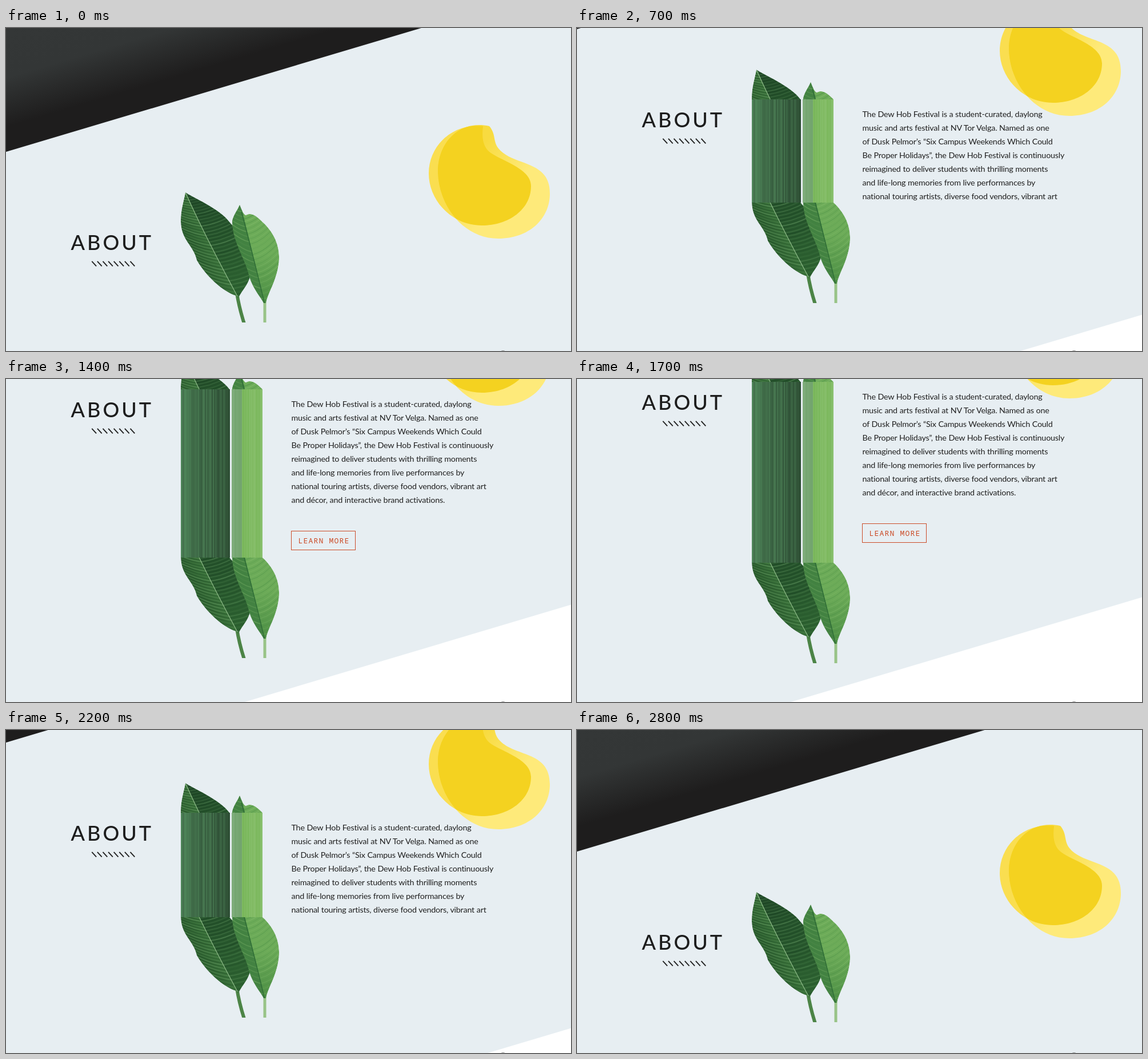
Write an HTML page that moves like this. It is 989 px wide and 566 px high and loops after 2.95 s.

```html
<!DOCTYPE html>
<html lang="en">
<head>
<meta charset="utf-8">
<title>About</title>
<style>
  html, body { margin: 0; width: 100%; height: 100%; overflow: hidden; background: #e7eef2; }
  svg { display: block; width: 989px; height: 566px; }
  .title { font: 500 36px Lato, sans-serif; letter-spacing: 4px; fill: #1d1d1d; }
  .copy { font: 14.3px Lato, sans-serif; letter-spacing: -.2px; word-spacing: .3px; fill: #1f1f1f; }
  .btn { font: 13px "Noto Sans Mono", monospace; letter-spacing: 1.2px; fill: #cb4c28; }
</style>
</head>
<body>
<svg viewBox="0 0 989 566">
  <defs>
    <linearGradient id="night" gradientUnits="userSpaceOnUse" x1="0" y1="217" x2="-59" y2="18">
      <stop offset=".2" stop-color="#1e1d1d"/>
      <stop offset=".6" stop-color="#333636"/>
      <stop offset="1" stop-color="#343737"/>
    </linearGradient>
    <linearGradient id="glow" gradientUnits="userSpaceOnUse" x1="838" y1="200" x2="905" y2="262">
      <stop stop-color="#f8db40"/>
      <stop offset="1" stop-color="#feea7a"/>
    </linearGradient>
    <linearGradient id="deep" gradientUnits="userSpaceOnUse" x1="318" y1="400" x2="372" y2="372">
      <stop stop-color="#27572b"/>
      <stop offset="1" stop-color="#417c40"/>
    </linearGradient>
    <linearGradient id="shade" x2=".4" y2="1">
      <stop stop-color="#1f4627"/>
      <stop offset="1" stop-color="#2d6231"/>
    </linearGradient>
    <linearGradient id="pale" x2="0" y2="1">
      <stop offset=".5" stop-color="#6cab58"/>
      <stop offset="1" stop-color="#4d8f45"/>
    </linearGradient>

    <path id="back" d="M314 288C325 296 376 318 391 340C412 362 424 405 428 432C424 452 410 462 407 474L402 469C380 462 350 435 334 407C328 380 306 372 306 338C306 318 311 305 314 288Z"/>
    <path id="front" d="M409 310C413 320 416 327 420 328C430 322 440 331 449 340C468 357 479 380 478 405C476 440 459 462 455 482H451C447 472 430 456 424 428C417 402 396 372 396 338C399 326 405 320 409 310Z"/>
    <path id="sunA" d="M835 172C833 190 834 203 843 214C858 231 919 243 919 277C919 318 880 346 833 346C780 346 740 302 740 255C740 206 782 166 835 172Z"/>
    <path id="sunB" d="M846 172C858 186 852 198 862 211C888 243 952 230 952 290C952 335 915 369 862 369C800 369 756 310 756 250C756 205 790 160 846 172Z"/>

    <clipPath id="inBack"><use href="#back"/></clipPath>
    <clipPath id="inFront"><use href="#front"/></clipPath>
    <clipPath id="inSun"><use href="#sunA"/></clipPath>
    <clipPath id="upper"><rect x="290" y="270" width="210" height="70"/></clipPath>
    <clipPath id="lower"><rect x="290" y="340" width="210" height="176"/></clipPath>
    <clipPath id="reveal"><rect id="mask" x="490" width="400"/></clipPath>

    <g id="leaves" fill="none">
      <path d="M404 464Q408 490 417 518" stroke="#4c8446" stroke-width="6"/>
      <g clip-path="url(#inBack)">
        <use href="#back" fill="url(#deep)"/>
        <path d="M314 286Q346 360 405 470H460V270Z" fill="url(#shade)"/>
        <g id="backVeins"/>
        <path d="M314 288Q346 360 405 470" stroke="#8db987" stroke-width="1.200"/>
      </g>
      <path d="M453 474V518" stroke="#98c387" stroke-width="5"/>
      <g clip-path="url(#inFront)">
        <use href="#front" fill="url(#pale)"/>
        <path d="M410 305Q433 400 453 484H390V300Z" fill="#438242"/>
        <g id="frontVeins"/>
        <path d="M412 322Q433 400 453 484" stroke="#2f6d36" stroke-width="1.500"/>
      </g>
    </g>
  </defs>

  <rect width="989" height="566" fill="#e7eef2"/>
  <g id="page">
    <path d="M0 0H727L0 217Z" fill="url(#night)"/>
    <path d="M0 1012.700L989 717.500V1300H0Z" fill="#fff"/>

    <use href="#sunA" fill="#fade50"/>
    <use href="#sunB" fill="url(#glow)"/>
    <use href="#sunB" fill="#f4d220" clip-path="url(#inSun)"/>

    <text class="title" x="113.500" y="389">ABOUT</text>
    <g id="hatch" stroke="#222" stroke-width="1.900"/>

    <g clip-path="url(#upper)"><use href="#leaves"/></g>
    <g id="stretch" shape-rendering="crispEdges"/>
    <g id="drop"><use href="#leaves" clip-path="url(#lower)"/></g>

    <g clip-path="url(#reveal)">
      <g id="copy" class="copy"/>
      <rect x="499.500" y="588.500" width="112" height="33" fill="none" stroke="#cb4c28"/>
      <text class="btn" x="511.500" y="610">LEARN MORE</text>
    </g>
  </g>
  <ellipse cx="870" cy="566.300" rx="3.500" ry="1" fill="#666"/>
</svg>
<script>
const $ = id => document.getElementById(id);

function add(parent, name, attrs) {
  const el = document.createElementNS('http://www.w3.org/2000/svg', name);
  for (const k in attrs) el.setAttribute(k, attrs[k]);
  return $(parent).appendChild(el);
}

let seed = 7;
const random = () => (seed = (seed * 16807) % 2147483647) / 2147483647;

// Veins curve up and out on both sides of a quadratic midrib
function veins(group, rib, count, reach, rise, tones) {
  const at = (t, i) => (1 - t) ** 2 * rib[0][i] + 2 * t * (1 - t) * rib[1][i] + t * t * rib[2][i];
  for (let i = 0; i <= count; i++) {
    for (const side of [-1, 1]) {
      add(group, 'path', {
        d: `M${at(i / count, 0)} ${at(i / count, 1)}q${side * reach / 2} ${-rise * .15} ${side * reach} ${-rise}`,
        stroke: tones[i % 2],
        'stroke-width': .7 + random() * .9,
        opacity: .12 + random() * .3
      });
    }
  }
}
veins('backVeins', [[314, 288], [346, 360], [405, 470]], 64, 76, 34, ['#79ad74', '#12351b']);
veins('frontVeins', [[412, 322], [433, 400], [453, 484]], 36, 48, 36, ['#8cc274', '#3e823f']);

// Vertical streaks between the leaf halves, one unit tall
function streaks(x0, x1, hue, sat, from, to, noise) {
  for (let x = x0; x < x1; x += 2) {
    const light = from + (to - from) * (x - x0) / (x1 - x0) + (random() - .5) * noise;
    add('stretch', 'rect', { x, width: Math.min(2, x1 - x), height: 1, fill: `hsl(${hue} ${sat}% ${light}%)` });
  }
}
streaks(306, 392, 132, 26, 40, 26, 9);
streaks(395, 413, 115, 23, 56, 51, 6);
streaks(413, 449, 100, 39, 54, 58, 5);

for (let i = 0; i < 8; i++) add('hatch', 'path', { d: `M${150.3 + i * 9.6} 408.900l7.800 8.500` });

[
  'The Dew Hob Festival is a student-curated, daylong',
  'music and arts festival at NV Tor Velga. Named as one',
  'of Dusk Pelmor’s “Six Campus Weekends Which Could',
  'Be Proper Holidays”, the Dew Hob Festival is continuously',
  'reimagined to deliver students with thrilling moments',
  'and life-long memories from live performances by',
  'national touring artists, diverse food vendors, vibrant art',
  'and décor, and interactive brand activations.'
].forEach((line, i) => {
  add('copy', 'text', { x: 499.5, y: 371 + i * 24 }).textContent = line;
});

// Step, page scroll, and how far the leaf stretch trails behind it
const keys = [
  [0, 0, 0], [3, 98, 31], [7, 214.5, 34], [14, 322, 27],
  [16.5, 340, 20], [20, 271.5, 8], [24, 115.3, 16], [28, 3.7, 3.7]
];

// Smooth curve through one column of the keys
function curve(col, x) {
  const last = keys.length - 1;
  const slope = i => {
    const a = keys[Math.max(0, i - 1)], b = keys[Math.min(last, i + 1)];
    return (b[col] - a[col]) / (b[0] - a[0]);
  };
  let i = 0;
  while (i < last - 1 && x >= keys[i + 1][0]) i++;
  const h = keys[i + 1][0] - keys[i][0], t = (x - keys[i][0]) / h, u = 1 - t;
  return u * u * (1 + 2 * t) * keys[i][col] + t * t * (3 - 2 * t) * keys[i + 1][col]
    + h * t * u * (u * slope(i) - t * slope(i + 1));
}

const LOOP = 2950, STEP = 100, LAST = 28;
const start = performance.now();

function draw(now) {
  const time = Math.max(0, now - start) % LOOP;
  const step = Math.min(LAST, Math.floor(time / STEP));
  const scroll = Math.round(curve(1, step));
  const grow = Math.max(0, Math.round(scroll - curve(2, step)));
  $('page').setAttribute('transform', `translate(0 ${-scroll})`);
  $('drop').setAttribute('transform', `translate(0 ${grow})`);
  $('stretch').setAttribute('transform', `translate(0 340) scale(1 ${grow})`);
  $('stretch').setAttribute('visibility', grow ? 'visible' : 'hidden');
  $('mask').setAttribute('height', 339 + grow);
  requestAnimationFrame(draw);
}
draw(start);
</script>
</body>
</html>
```
